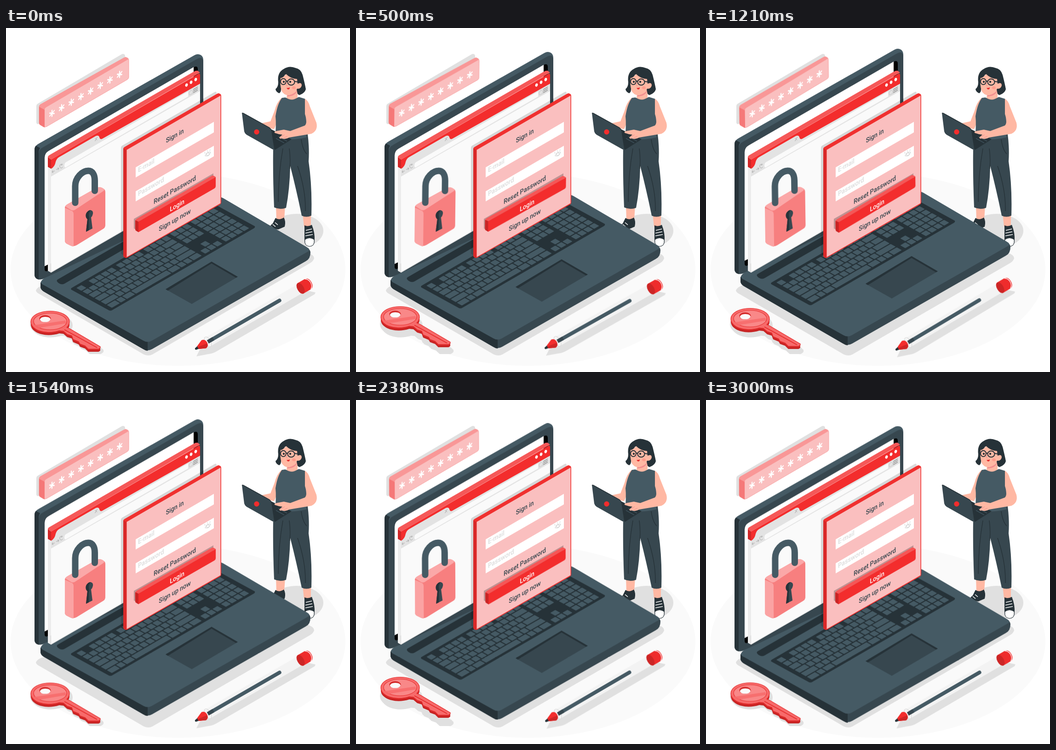
An HTML page that plays this animation: 748x748 px, repeating every 3040 ms.

```html
<!DOCTYPE html>
<html lang="en">
<head>
<meta charset="utf-8">
<title>Sign in</title>
<style>
  html, body { margin: 0; width: 100%; height: 100%; overflow: hidden; background: #fff; }
  svg { display: block; width: 100vw; height: 100vh; }
  text { font-family: Roboto, Arial, sans-serif; font-size: 14.7px; font-weight: 500; fill: #37474f; }
  .mid { text-anchor: middle; }
  .hint { fill: #dcdcdc; }
  .laptop { animation: float 3040ms linear infinite; }
  .key { animation: float 1520ms linear infinite; }
  .wind { animation: wind 1520ms linear infinite; transform-box: fill-box; transform-origin: center; }
  @keyframes float { 50% { transform: translateY(-15px); } }
  @keyframes wind {
    0%, 100% { transform: rotate(0deg); }
    25% { transform: rotate(1deg); }
    75% { transform: rotate(-1deg); }
  }
</style>
</head>
<body>
<svg viewBox="0 0 748 748" xmlns="http://www.w3.org/2000/svg">
  <defs>
    <path id="keyTop" d="M138 638.5 Q138 645 132 651 L139 654 L205 693 Q206 696 201 698 H179 L172 691 L161 687 L158 682 L146 677 L143 669 L133 666 L125 659 L116 658 C84 668 54 656 54 638.500 C54 626 72 615.500 96 615.500 S138 626 138 638.500 Z"/>
  </defs>

  <ellipse cx="374" cy="525.5" rx="364" ry="209" fill="#fafafa"/>
  <ellipse cx="632" cy="441" rx="58" ry="37" fill="#e0e0e0"/>

  <!-- woman -->
  <g>
    <path d="M587 386 H607 L605 416 L588 418 Z M645 404 H663 V432 H648 Z" fill="#ffb8a3"/>
    <path d="M586 413 Q594 419 604 412 Q609 420 606 432 L592 438 L574 436 Q573 430 580 425 Z" fill="#263238"/>
    <path d="M585 423 l6 5 M580 427 l6 5 M576 431 l5 4" stroke="#fff" stroke-width="1.6"/>
    <path d="M649 429 Q656 433 665 428 Q672 446 671 462 Q671 475 660 475 Q649 474 649 462 Z" fill="#263238"/>
    <path d="M650 460 Q660 453 670 460 Q672 474 660 475 Q648 474 650 460 Z" fill="#fff" stroke="#263238"/>
    <path d="M652 440 l13 -3 M651 446 l15 -3 M651 452 l16 -3" stroke="#fff" stroke-width="1.6"/>
    <path d="M584 238 L656 231 Q660 262 658 290 Q666 345 664 408 Q653 413 643 408 Q631 350 618 300 Q617 350 609 391 Q596 396 583 390 Q580 320 581 262 Z" fill="#37474f"/>
    <path d="M616 262 Q619 284 617 306 M602 262 Q592 320 592 378 M642 242 Q645 265 654 274 M634 300 Q652 352 651 398" fill="none" stroke="#263238" stroke-width="1.4"/>
    <path d="M600 151 Q588 162 584 180 L575 203 L556 207 L560 215 L583 220 L596 190 Z" fill="#ffb8a3"/>
    <path d="M607 151 Q622 158 637 150 L650 154 Q654 190 653 238 Q617 246 585 240 Q588 210 586 192 Q590 165 600 152 Z" fill="#455a64"/>
    <path d="M612 135 H634 V151 Q622 160 610 152 Z" fill="#ffb8a3"/>
    <path d="M612 144 Q624 146 633 136 Q630 148 612 149 Z" fill="#f28f8f"/>
    <path d="M592 118 Q589 97 604 89 Q616 81 630 87 Q641 89 645 102 Q650 122 652 133 Q650 141 640 145 Q637 147 634 143 Q630 128 628 105 L606 101 Q598 105 598 130 Q599 139 594 142 Q587 139 586 133 Q592 128 592 118 Z" fill="#263238"/>
    <path d="M597 108 Q607 105 610 99 Q622 109 633 105 L634 121 Q643 117 643 125 Q641 133 633 132 Q629 143 616 146 Q604 147 599 136 Q595 122 597 108 Z" fill="#ffb8a3"/>
    <path d="M608 99 Q618 110 633 111 L634 121 Q641 119 644 110 Q640 92 620 90 Q604 91 597 109 Q605 107 608 99 Z" fill="#263238"/>
    <g fill="none" stroke="#263238" stroke-width="2">
      <ellipse cx="603" cy="116.5" rx="6" ry="6.5"/>
      <ellipse cx="620" cy="117.500" rx="7.500" ry="6.800"/>
      <path d="M609 115.500 h4 M627 116 L638 118"/>
    </g>
    <circle cx="604" cy="117" r="2.200" fill="#263238"/>
    <circle cx="618" cy="117" r="2.200" fill="#263238"/>
    <path d="M611 118 Q608 124 610 126 h3" fill="none" stroke="#f28f8f"/>
    <path d="M610 130 Q614 131 617 129 Q617 135 612 133 Z" fill="#e52d2d"/>
    <ellipse cx="626" cy="130" rx="4" ry="3" fill="#ff9c8c"/>
    <path d="M576 220 L621 242 L585 265 Z" fill="#263238"/>
    <path d="M513 185 Q515 184 519 187 L573 217 Q577 220 578 225 L584 264 Q581 265 578 263 L523 232 Q519 229 518 225 Z" fill="#37474f"/>
    <path d="M513 185.500 Q515 184 519 187 L573 217 Q577 220 578 225 L584 264" fill="none" stroke="#263238" stroke-width="1.500"/>
    <circle cx="545" cy="226" r="5.700" fill="#f32d2d"/>
    <path d="M587 240 L605 250 M592 236 L611 246" stroke="#455a64" stroke-width="1.300"/>
    <path d="M650 154 Q657 157 661 171 L675 206 Q679 223 664 230 L616 238 Q608 243 599 240 Q596 242 594 238 L601 232 Q592 231 584 228 Q583 225 588 224 L604 221 L618 224 L650 212 Q656 206 650 187 Z" fill="#ffb8a3"/>
    <path d="M597 237 l9 -5 M604 239 l8 -4" stroke="#f28f8f"/>
  </g>

  <!-- laptop -->
  <path d="M65 571 Q66 565 78 560 L640 485 Q670 490 670 501 Q668 508 658 513 L318 710 Q310 714 300 710 L72 578 Q66 575 65 571 Z" fill="#e0e0e0"/>
  <g class="laptop">
    <path d="M62 265 Q62 256 72 251 L410 59 Q417 55 424 59 Q429 62 429 71 V400 L80 546 Q72 548 67 545 Q62 542 62 536 Z" fill="#455a64"/>
    <path d="M62 265 Q62 259 65 256 L74 261 Q71 265 71 272 V547 Q68 546 66 545 Q62 542 62 536 Z" fill="#263238"/>
    <path d="M71 274 Q71 264 81 259 L414 68 Q429 60 429 74 V400 L78 546 L71 547 Z" fill="#37474f"/>
    <path d="M84 282 Q84 272 93 267 L407 86 Q417 80 417 90 V340 L91 528 Q84 531 84 524 Z"/>
    <path d="M84 282 Q84 272 93 267 L408 85 V340 L92 514 L84 518 Z" fill="#fff"/>

    <path d="M75 557 Q75 549 84 544 L452 370 Q462 365 472 370 L654 477 Q662 482 662 488 Q662 502 652 507 L318 698 Q308 704 298 698 L82 573 Q75 569 75 562 Z" fill="#37474f"/>
    <path d="M75 553 L308 680 V702 Q302 701 298 698 L82 573 Q75 569 75 562 Z" fill="#263238"/>
    <path d="M76 553 Q77 548 86 543 L452 369 Q462 364 472 370 L654 476.500 Q664 482 655 487 L317 680 Q308 685 299 680 L84 560 Q77 557 76 553 Z" fill="#455a64"/>
    <path d="M112 547 L400 381 V398 L127 556 Q121 559 115 555 Q108 550 112 547 Z" fill="#263238"/>
    <path d="M143 565 L455 384 L541 431 Q542 433 540 435 L230 614 Q227 615 224 614 L142 569 Q140 567 143 565 Z" fill="#263238"/>
    <g id="keys" transform="matrix(3.14 -1.82 .86 .48 141 567)" fill="#455a64"/>
    <path d="M347 568 L447 508 L504 541 L404 600 Z" fill="#37474f"/>
    <path d="M347 568 L447 508 L504 541 L500 543 L447 512 L352 571 Z" fill="#263238"/>
  </g>

  <!-- browser -->
  <path d="M91 300 L98 304 V532 L91 528 Z" fill="#ececec"/>
  <path d="M98 304 L422 117 V345 L98 532 Z" fill="#fafafa"/>
  <path d="M97.500 512 V531.500 L256 440" fill="none" stroke="#d2d2d2"/>
  <path d="M91 281 Q91 278 95 276 L410 94 Q414 92 417 93 L422 97 L98 286 Z" fill="#f55858"/>
  <path d="M98 286 L418 100 Q422 98 422 102 V123 L98 309 Z" fill="#f32d2d"/>
  <path d="M91 281 L98 286 V306 L91 302 Z" fill="#d02626"/>
  <path d="M98 306 Q106 302 108 291 Q110 284 115 281 L195 235 Q201 232 203 237 Q204 243 209 241 L422 121 V137 L98 323 Z" fill="#e3e3e3"/>
  <path d="M130 292 L396 138 V149 L130 303 Q127 304 127 299 Q127 294 130 292 Z" fill="#fafafa"/>
  <g fill="#fff">
    <ellipse cx="392.500" cy="124" rx="2.700" ry="3.700" transform="rotate(20 392.500 124)"/>
    <ellipse cx="402.500" cy="118" rx="2.700" ry="3.700" transform="rotate(20 402.500 118)"/>
    <ellipse cx="412.500" cy="112" rx="2.700" ry="3.700" transform="rotate(20 412.500 112)"/>
  </g>
  <g fill="none" stroke="#aaa">
    <path d="M193.500 239 l5 5 M193.500 246 l5 -9"/>
    <path d="M100 313.500 l6 -3 m-4 -1 l-2 4 l3 1 M109 308 l6 -3 m-3 -1 l3 1 l-2 4 M122 297 a3.200 4.200 0 1 0 1 5 M122 295 v3 h-3"/>
    <path d="M398 141 l4 -6 l4 2 v5 l-7 4 z" stroke="#c8c8c8"/>
    <path d="M407 134 l10 -6 m-10 9.500 l10 -6 m-10 9.500 l10 -6" stroke="#888" stroke-width="1.400"/>
  </g>

  <!-- padlock -->
  <g class="wind">
    <path d="M128 391 Q128 386 134 383 L196 348 Q202 345 208 347 L213 350 Q216 352 216 357 V429 Q216 434 211 437 L154 472 Q147 476 140 473 L132 469 Q128 467 128 462 Z" fill="#f77f7f"/>
    <path d="M128 391 L144 398 Q147 400 147 405 V475 Q143 475 140 473 L132 469 Q128 467 128 462 Z" fill="#fba3a3"/>
    <path d="M129 388 Q130 385 134 383 L196 348 Q202 345 208 347 L214 351 Q214 353 211 355 L152 394 Q147 398 142 396 Z" fill="#fba8a8"/>
    <path d="M150.500 380 V344 C150.500 325 166 310.500 179 310.500 C188 310.500 193 319 193 332 V354" fill="none" stroke="#455a64" stroke-width="14" stroke-linecap="round"/>
    <path d="M177 416 Q172 411 174 404 Q178 396 184 396 Q190 397 189 404 Q188 409 185 412 L188 436 L174 443 Z" fill="#37474f"/>
    <path d="M177 416 Q172 411 174 404 Q178 396 184 396 Q179 402 180 409 Q182 414 180 418 L180 440 L174 443 Z" fill="#263238"/>
  </g>

  <!-- sign-in panel -->
  <path d="M250 260 Q250 257 254 255 L454 139 Q458 137 458 142 V375 L255 494 L250 491 Z" fill="#000" opacity=".14"/>
  <path d="M255 263 Q255 260 259 258 L459 143 Q462 141 465 143 Q468 144 468 148 V379 Q468 382 465 384 L264 499 Q261 501 258 499 Q255 498 255 494 Z" fill="#f0302f"/>
  <path d="M255 262 L262 265 V500 Q255 499 255 494 Z" fill="#d92828"/>
  <path d="M262.500 265 L466.500 147 V381 L262.500 498 Z" fill="#fabfbf"/>
  <path d="M282 303 L452 204 V227 L282 325 Z M282 355 L452 256 V279 L282 377 Z" fill="#fff"/>
  <g fill="none" stroke="#d5d5d5" stroke-width="1.200">
    <path d="M433 278 Q437 268 445 270 Q441 280 433 278 Z"/>
    <ellipse cx="439" cy="274.500" rx="2.600" ry="3.400"/>
    <path d="M433 273 l-1 -3 M438 269 v-3 M443 267 l1 -3"/>
  </g>
  <g id="labels"></g>
  <path d="M278 415 L451 316 V340 L282 438 L278 436 Z" fill="#000" opacity=".23"/>
  <g class="wind">
    <path d="M281 420 Q281 417 284 415 L448 321 Q450 320 456 324 L288 421 Z" fill="#f65656"/>
    <path d="M288 421 L456 324 V344 Q456 347 453 349 L288 444 Z" fill="#f32d2d"/>
    <path d="M281 418 L288 421 V444 L283 441 Q281 440 281 437 Z" fill="#c92525"/>
    <text class="mid" style="fill:#fff" transform="matrix(.866 -.5 0 1 372 390.500)">Login</text>
  </g>

  <!-- password bar -->
  <path d="M66 170 Q66 166 70 164 L250 58 Q254 55 257 57 Q259 58 259 62 V98 L70 209 Q66 209 66 205 Z" fill="#e0e0e0"/>
  <g class="wind">
    <path d="M72 172 Q72 167 77 165 L256 65 Q260 62 264 65 Q267 66 267 70 V107 Q267 110 264 112 L89 214 Q84 217 80 214 L75 211 Q72 210 72 206 Z" fill="#fabfbf" stroke="#f79595" stroke-width=".8"/>
    <path d="M72 171 L84 177 V216 Q82 216 80 214 L75 211 Q72 210 72 206 Z" fill="#f57878"/>
    <path d="M72 171 Q72 167 77 165 L256 65 Q260 62 264 65 L266 68 L88 172 Q84 174 84 178 Z" fill="#f99797"/>
    <g id="stars" stroke="#fff" stroke-width="2.700" stroke-linecap="round"></g>
  </g>

  <!-- key -->
  <g fill="#e0e0e0" stroke="#e0e0e0" stroke-width="6" stroke-linejoin="round">
    <use href="#keyTop" x="1" y="5"/>
    <use href="#keyTop" x="4" y="8"/>
  </g>
  <g class="key">
    <use href="#keyTop" y="6" fill="#c52222"/>
    <use href="#keyTop" y="3" fill="#d32727"/>
    <use href="#keyTop" fill="#f76b6b" stroke="#e52c2c" stroke-width="1.200"/>
    <ellipse cx="96" cy="638" rx="36" ry="18" fill="#f98888" stroke="#e83636" stroke-width="1.200"/>
    <path d="M62 646 L129 636 L131 642 L72 652 Z" fill="#f76f6f"/>
    <path d="M127 656 L198 695" stroke="#e52c2c" stroke-width="1.800"/>
    <ellipse cx="85" cy="632" rx="12.500" ry="7.500" fill="#d32727"/>
    <path d="M73.500 634 Q76 627.500 86 628 Q96 628 97 634 Q94 639.500 85 639.500 Q76 639.500 73.500 634 Z" fill="#fafafa"/>
  </g>

  <!-- pen -->
  <g class="wind">
    <path d="M414 714 L421 700 L444 692 L650 570 L673 575 L671 579 L458 703 Q450 708 440 709 Z" fill="#e0e0e0"/>
    <g transform="translate(412 698) rotate(-30)">
      <path d="M28 -11 H258 V11 H28 Q23 0 28 -11 Z" fill="#f3f3f3"/>
      <path d="M31 -4 H211 Q215 -4 215 0 T211 4 H31 Z" fill="#455a64"/>
      <ellipse cx="31" cy="0" rx="6" ry="12" fill="#fafafa" fill-opacity=".5" stroke="#d4d4d4"/>
      <path d="M0 -2 L10 -4 V4 L0 2 Q-2 0 0 -2 Z" fill="#263238"/>
      <path d="M7 -4 L21 -10 Q29 -9 29 0 T21 10 L7 4 Q5 0 7 -4 Z" fill="#f32d2d"/>
      <path d="M7 4 Q5 0 7 -1 L28 2 Q27 9 21 10 Z" fill="#cf2626"/>
      <path d="M31 -4 H45 V4 H31 Z" fill="#37474f"/>
      <path d="M264 -13 H283 Q291 -11 291 0 T283 13 H264 Q257 11 257 0 T264 -13 Z" fill="#ee2c2c"/>
      <ellipse cx="264" cy="0" rx="7" ry="13" fill="#cc2525"/>
      <path d="M282 -13 Q289 -9 289 0 T282 13" fill="none" stroke="#fff" stroke-width="1.300"/>
    </g>
  </g>
</svg>
<script>
  const NS = "http://www.w3.org/2000/svg";
  const byId = id => document.getElementById(id);
  function add(parent, tag, attrs, text = "") {
    const el = document.createElementNS(NS, tag);
    for (const name in attrs) el.setAttribute(name, attrs[name]);
    el.textContent = text;
    parent.append(el);
  }
  const iso = (x, y) => `matrix(.866 -.5 0 1 ${x} ${y})`;

  [["Sign in", 367, 239, "mid"], ["E-mail", 287, 314, "hint"], ["Password", 287, 366, "hint"],
   ["Reset Password", 367, 356.8, "mid"], ["Sign up now", 367, 422.3, "mid"]]
    .forEach(([label, x, y, cls]) => add(byId("labels"), "text", { class: cls, transform: iso(x, y) }, label));

  for (let i = 0; i < 8; i++) {
    add(byId("stars"), "path", {
      d: "M0 -6.5 V6.5 M-5.6 -3.2 L5.6 3.2 M-5.6 3.2 L5.6 -3.2",
      transform: iso(100 + 21 * i, 185.5 - 12.1 * i)
    });
  }

  // Key widths per row; a negative width leaves a gap.
  const UNIT = 4.2, ROW = 15.4;
  const ones = n => Array(n).fill(1);
  function keyRow(row, left, widths) {
    let u = left;
    for (const w of widths) {
      const step = Math.abs(w) * UNIT;
      if (w > 0) add(byId("keys"), "rect", {
        x: u + 0.35, y: 4 + row * ROW + 1.3, width: step - 0.7, height: ROW - 2.6, rx: 0.4, ry: 1
      });
      u += step;
    }
  }
  const main = [
    [1, -1, ...ones(4), -0.5, ...ones(4), -0.5, ...ones(4)],
    [...ones(13), 2],
    [1.5, ...ones(12), 1.5],
    [1.8, ...ones(11), 2.2],
    [2.3, ...ones(10), 2.7],
    [1.5, 1, 1.5, 6, 1.5, 1, 1, 1.5]
  ];
  const nav = [ones(3), ones(3), ones(3), [], [-1, 1], ones(3)];
  for (let row = 0; row < 6; row++) {
    keyRow(row, 2, main[row]);
    keyRow(row, 66.7, nav[row]);
    keyRow(row, 81, ones(4));
  }
</script>
</body>
</html>
```
